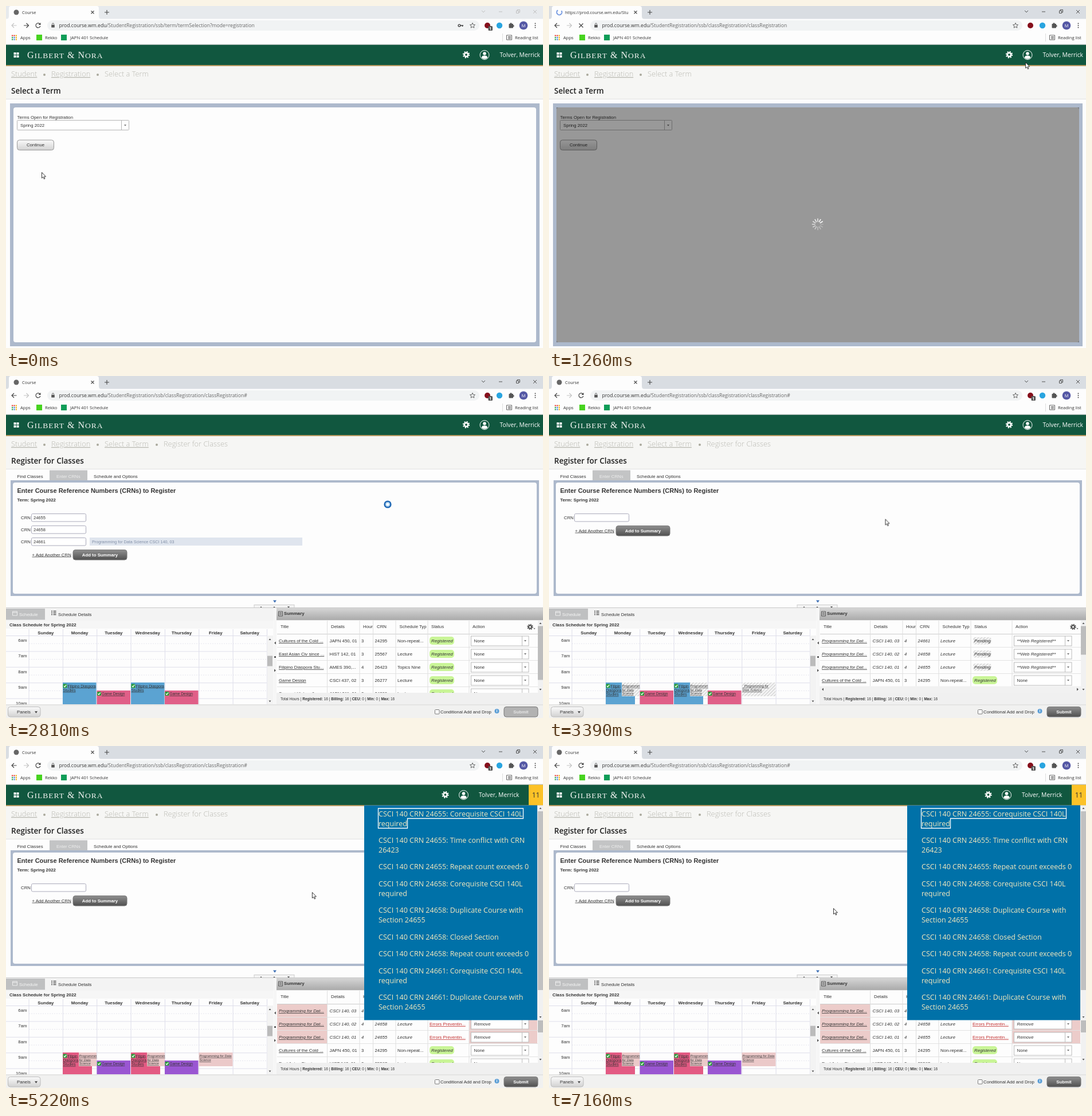
Recreate the animation shown at these times as an HTML page. Size 937 by 597 pixels, loop 7260 ms.

```html
<!DOCTYPE html>
<html lang="en">
<head>
<meta charset="utf-8">
<title>Register for Classes</title>
<style>
  html, body { margin: 0; width: 100%; height: 100%; overflow: hidden; background: #fdfdfd; }
  svg { display: block; font: 7.8px "Liberation Sans", Arial, sans-serif; fill: #333; }
  text { white-space: pre; }
  .ui { font-family: "Open Sans", "Noto Sans", sans-serif; }
  .serif { font-family: "Liberation Serif", serif; }
  .b { font-weight: 700; }
  .i { font-style: italic; }
  .u { text-decoration: underline; }
  .mid { text-anchor: middle; }
  .end { text-anchor: end; }
  .phase { animation: 7260ms step-end infinite; }
  .pointer { animation: pointer 7260ms linear infinite; }
  .spokes { animation: turn 1s steps(12) infinite; }
  .arc { animation: turn .9s linear infinite; }
  @keyframes turn { to { transform: rotate(360deg); } }
</style>
</head>
<body>
<svg id="stage" width="937" height="597" viewBox="0 0 937 597"></svg>
<script>
const LOOP = 7260;
// Moments at which the page changes, in ms
const FOCUS = 500, WAIT = 630, NAV = 1000, BLANK = 1840, OPEN = 2420, READY = 2520,
      FILLED = 2620, ADDED = 3290, SAVING = 3500, FAILED = 4740;

const rules = new Map();
const pct = ms => (ms / LOOP * 100).toFixed(3) + '%';

function on(from, to, body) {
  const name = `on${from}-${to}`;
  const steps = (from ? `0%{opacity:0}` : '') + `${pct(from)}{opacity:1}` +
    (to < LOOP ? `${pct(to)}{opacity:0}` : '');
  rules.set(name, `@keyframes ${name}{${steps}}`);
  return `<g class="phase" style="animation-name:${name}">${body}</g>`;
}
const R = (x, y, w, h, fill, more = '') =>
  `<rect x="${x}" y="${y}" width="${w}" height="${h}" fill="${fill}" ${more}/>`;
const T = (x, y, s, cls = '', more = '') => `<text x="${x}" y="${y}" class="${cls}" ${more}>${s}</text>`;
const P = (d, stroke, w = 1, more = '') =>
  `<path d="${d}" fill="none" stroke="${stroke}" stroke-width="${w}" ${more}/>`;
const C = (x, y, r, fill, more = '') => `<circle cx="${x}" cy="${y}" r="${r}" fill="${fill}" ${more}/>`;
const at = (x, y, body) => `<g transform="translate(${x} ${y})">${body}</g>`;
const size = n => `font-size="${n}"`;
const down = (x, y, fill = '#777', s = 2) => `<path d="M${x - s} ${y - s / 2}h${2 * s}l${-s} ${s * 1.4}z" fill="${fill}"/>`;
const up = (x, y, fill = '#777', s = 2) => `<path d="M${x - s} ${y + s / 2}h${2 * s}l${-s} ${-s * 1.4}z" fill="${fill}"/>`;
const side = (x, y, dir) => `<path d="M${x} ${y - 2.5}v5l${dir * 3} -2.5z" fill="#555"/>`;
const each = (list, fn) => list.map(fn).join('');

const gear = (x, y, fill, s = 1) => `<g transform="translate(${x} ${y}) scale(${s})">` +
  C(0, 0, 3.2, 'none', `stroke="${fill}" stroke-width="2.6"`) +
  C(0, 0, 5.2, 'none', `stroke="${fill}" stroke-width="2" stroke-dasharray="2.04"`) + '</g>';

const spinner = (x, y) => at(x, y, '<g class="spokes">' + each([...Array(12).keys()], k =>
  `<path d="M0 -5V-9.5" stroke="#fff" stroke-width="1.7" stroke-linecap="round" opacity="${(.2 + k * .07).toFixed(2)}" transform="rotate(${k * 30})"/>`) + '</g>');

const darkButton = (x, y, w, label, fill = 'url(#dark)', ink = '#fff') =>
  R(x, y, w, 17.5, fill, 'rx="4" stroke="#777"') + T(x + w / 2, y + 11.3, label, 'b mid', `style="fill:${ink}"`);

/* ---- browser frame ---- */
function titleBar(bar, ink) {
  return R(0, 0, 937, 23, bar) +
    P('M830 8l3 3 3-3M860 10h6M890.500 8.500h4v4h-4zM892 8v-1.500h4.500v4.500h-1.500M920 7l6 6M926 7l-6 6', ink, .9);
}
function navArrows(back, next) {
  return P('M18.500 34h-8M14 30l-4 4 4 4', back, 1.2) + P('M31 34h8M35.500 30l4 4-4 4', next, 1.2);
}
const badge = R(841.5, 35, 7.5, 8, '#555', 'rx="1.5"') + T(845.2, 41.5, '1', 'ui mid b', size(6.5) + ' style="fill:#fff"');
const reload = P('M59.300 31.500a4 4 0 1 0 .6 3.500', '#444', 1.2) + '<path d="M60.500 29v4h-4z" fill="#444"/>';
const favicon = C(18, 11, 4.5, '#666');
const address = path => T(92.5, 37.3, `prod.course.wm.edu<tspan fill="#666">/StudentRegistration/ssb/${path}</tspan>`, 'ui', size(8.6));
const appColors = ['#e4443a', '#e4443a', '#f2b51d', '#35a853', '#4285f4', '#f2b51d', '#35a853', '#4285f4', '#f2b51d'];

function browser() {
  return on(0, FOCUS, titleBar('#e7eaed', '#bbb')) + on(FOCUS, LOOP, titleBar('#d9dde2', '#444')) +
    '<path d="M0 23q5 0 5-5V4q0-4 4-4h149q4 0 4 4v14q0 5 5 5z" fill="#fdfdfd"/>' +
    P('M148.500 8.500l5 5M153.500 8.500l-5 5M172 11h8M176 7v8', '#444', 1.1) +
    on(0, NAV, favicon) + on(READY, LOOP, favicon) +
    on(NAV, READY, at(18, 11, '<g class="arc">' + P('M-4.500 0a4.500 4.500 0 1 1 4.500 4.500', '#4275d8', 1.5) + '</g>')) +
    on(NAV, BLANK, T(28, 14, 'https://prod.course.wm.edu/Stu', 'ui', size(7.4) + ' clip-path="url(#tab)"')) +
    each([[0, NAV], [BLANK, LOOP]], ([a, b]) => on(a, b, T(28, 14, 'Course', 'ui', size(7.4)))) +
    R(0, 22.5, 937, 44.5, '#fdfdfd') + R(72, 25, 754, 18, '#f1f3f4', 'rx="9"') +
    on(0, NAV, navArrows('#c4c4c4', '#444')) + on(NAV, LOOP, navArrows('#444', '#c4c4c4')) +
    on(0, NAV, reload) + on(READY, LOOP, reload) +
    on(NAV, READY, P('M52.500 30.500l7 7M59.500 30.500l-7 7', '#444', 1.2)) +
    R(79.2, 33, 5.6, 4.5, '#555', 'rx=".6"') + P('M80.500 33v-1.500a1.500 1.500 0 0 1 3 0v1.500', '#555', .9) +
    on(0, NAV, address('term/termSelection?mode=registration')) +
    on(NAV, READY, address('classRegistration/classRegistration')) +
    on(READY, LOOP, address('classRegistration/classRegistration#')) +
    on(0, NAV, C(791, 34, 1.9, 'none', 'stroke="#444" stroke-width="1.4"') + P('M793 34h5M796.500 34v2', '#444', 1.4)) +
    P('M814 29.500l1.300 3 3.200.3-2.400 2.100.7 3.200-2.800-1.700-2.800 1.700.7-3.200-2.400-2.100 3.200-.3z', '#555', .9) +
    C(840, 34, 5, '#850f1b') + on(0, NAV, badge) + on(READY, LOOP, badge) + C(861, 34, 5.2, '#2aa5e0') +
    R(877.5, 31, 7.5, 7.5, '#555', 'rx="1"') + C(881, 30.8, 1.5, '#555') + C(885.2, 34.7, 1.5, '#555') +
    C(903, 34, 7.3, '#5558a5') + T(903, 36.8, 'M', 'ui mid', size(7.4) + ' style="fill:#fff"') +
    each([30.5, 34, 37.5], y => C(923.5, y, .95, '#444')) +
    each(appColors, (c, k) => R(10 + k % 3 * 3.4, 50.6 + Math.floor(k / 3) * 3.4, 2.2, 2.2, c)) +
    R(53, 50, 10, 10, '#47d31f') + R(96, 50, 10, 10, '#0f9d58') +
    each([[25, 'Apps'], [68, 'Rekko'], [112, 'JAPN 401 Schedule'], [888, 'Reading list']],
      ([x, s]) => T(x, 57.5, s, 'ui', size(7.6))) +
    P('M866.500 48v14', '#ddd') + P('M873.500 51h9v8h-9zM876 53.500h5M876 55.200h5M876 57h5', '#555', .9) +
    P('M0 67h937', '#ccc');
}

/* ---- site header ---- */
const user = dx => at(dx, 0, gear(803, 85, '#fff') +
  C(835, 85.500, 8, 'none', 'stroke="#fff" stroke-width="1"') + C(835, 83, 2.8, '#fff') +
  '<path d="M829.800 90.500q0-4 5.200-4t5.200 4q-5.200 4-10.400 0z" fill="#fff"/>' +
  T(932, 89, 'Tolver, Merrick', 'ui end', size(10.3) + ' style="fill:#fff"'));

function header() {
  const low = s => `<tspan font-size="13.5">${s}</tspan>`;
  return R(0, 67.5, 937, 36, '#11573f') + R(0, 103, 937, 2, '#b99a62') + R(0, 105, 937, 57, '#f6f6f4') +
    P('M0 162.500h937', '#e2e2e2') +
    each([0, 1, 2, 3], k => R(13.500 + k % 2 * 5, 81 + (k >> 1) * 5, 4, 4, '#fff')) +
    T(37, 91, `G${low('ILBERT')} &amp; N${low('ORA')}`, 'serif', size(16) + ' letter-spacing="1" style="fill:#f2f5f2"') +
    on(0, FAILED, user(0)) + on(FAILED, LOOP, user(-36.5) + R(912, 67.5, 25, 36, '#fcc228') +
      T(924.5, 89.5, '11', 'ui mid', size(12)));
}
const crumb = (x, s, cls = 'u') => T(x, 123, s, 'ui ' + cls, size(12.8) + ' font-weight="300" style="fill:#b9b9b2"');
const dot = x => C(x, 120, 2, '#aaa99c');
const heading = s => T(9, 153, s, 'ui', size(13.5) + ' font-weight="600" style="fill:#222"');
const panel = (x, y, w, h, bx, by) => R(x, y, w, h, '#adb9cc') +
  R(x + bx, y + by, w - 2 * bx, h - 2 * by, '#fdfdfd', 'rx="4"');

/* ---- term page ---- */
function termPage() {
  return header() + crumb(9, 'Student') + dot(67) + crumb(79, 'Registration') + dot(160) +
    crumb(172, 'Select a Term', '') + heading('Select a Term') + panel(7, 170, 924, 424, 6, 7) +
    T(19.5, 197, 'Terms Open for Registration') +
    R(19.5, 199.500, 195, 17, '#fff', 'stroke="#b5b5b5" rx="1"') + P('M201.500 200v16', '#b5b5b5') +
    T(25, 211, 'Spring 2022') + down(208, 208) +
    R(19.5, 234, 64, 17.500, 'url(#light)', 'rx="4" stroke="#999"') + T(51.5, 245, 'Continue', 'mid') +
    on(WAIT, LOOP, R(13, 177, 912, 410, '#000', 'opacity=".4"') + spinner(469, 381));
}

/* ---- registration form ---- */
const crnRow = (y, value) => T(26, y + 3, 'CRN') +
  R(44.500, y - 6.500, 95, 13.500, '#fff', 'rx="2" stroke="#aab"') + T(48, y + 3, value, '', size(7.5));
const formEnd = y => T(45.5, y + 2.5, '+ Add Another CRN', 'u') + darkButton(117, y - 8.5, 94, 'Add to Summary');

function form() {
  const single = crnRow(247, '') + formEnd(270);
  return crumb(9, 'Student') + dot(67) + crumb(79, 'Registration') + dot(160) + crumb(172, 'Select a Term') +
    dot(263) + crumb(275, 'Register for Classes', '') + heading('Register for Classes') +
    R(76, 164.5, 66, 18, '#c3c4c5') + T(19.5, 178, 'Find Classes') +
    T(88, 178, 'Enter CRNs', '', 'style="fill:#eee"') + T(153, 178, 'Schedule and Options') +
    panel(8, 182, 922, 202, 4, 4) +
    T(19.5, 203.500, 'Enter Course Reference Numbers (CRNs) to Register', 'b', size(11)) +
    T(19.5, 219, 'Term: Spring 2022', 'b') +
    on(OPEN, FILLED, single) + on(ADDED, LOOP, single) +
    on(FILLED, ADDED, crnRow(247, '24655') + crnRow(268, '24658') + crnRow(289, '24661') +
      R(146, 282, 371, 14, '#dfe5ee') +
      T(150, 292, 'Programming for Data Science CSCI 140, 03', '', size(7.2) + ' style="fill:#7f8da5"') + formEnd(312));
}

/* ---- schedule ---- */
const check = (x, y) => R(x - 3.5, y - 3.5, 7, 7, '#2a9d3a', 'rx="1.5"') + P(`M${x - 2} ${y}l1.500 1.700 2.700-3.500`, '#fff', 1.2);
const lines = (x, y, list, cls, px, step) =>
  each(list, (s, k) => T(x + (k || cls.includes('i') ? 0 : 8), y + k * step, s, cls, size(px)));

function lecture(x, color, narrow) {
  return R(x, 535, narrow ? 51 : 58.5, 38, color) + check(x + 4, 541) +
    lines(x + .5, 543.500, narrow ? ['Filipin', 'Diaspora', 'Studies'] : ['Filipino Diaspora', 'Studies'], 'u', 6.6, 7.2);
}
const lab = (x, color) => R(x, 549, 58.5, 24, color) + check(x + 4, 554.5) + T(x + 8.5, 557, 'Game Design', 'u', size(6.6));
const added = (x, fill, list) => R(x, 535, 31, 24, fill) + lines(x + .5, 543, list, 'u i', 5.7, 6.7);

function events(main, second, fill) {
  const names = ['Programmin', 'for Data', 'Science'];
  return lecture(99, main, !!fill) + lab(158.5, second) + lecture(218, main, !!fill) + lab(277, second) +
    (fill ? added(127, fill, names) + added(246, fill, names) + R(336.5, 535, 59, 24, fill) +
      lines(337.5, 543, fill[0] === 'u' ? ['  Programming for', 'Data Science'] : ['Programming for Data', 'Science'], 'u i', 5.7, 7) : '');
}

function schedule() {
  const days = ['Sunday', 'Monday', 'Tuesday', 'Wednesday', 'Thursday', 'Friday', 'Saturday'];
  const hours = ['6am', '7am', '8am', '9am', '10am'];
  return R(0, 405, 470, 22, '#f3f3f3') + P('M0 404.500h937', '#c9c9c9') +
    R(0, 406, 68, 19.5, '#bfc0c1') + P('M11.500 411h8v7h-8zM11.500 413h8', '#eee') + T(23, 419, 'Schedule', '', 'style="fill:#f7f7f7"') +
    P('M79 410.500h2M79 413.500h2M79 416.500h2M82.500 410.500h5M82.500 413.500h5M82.500 416.500h5', '#555', 1.6) + T(91, 419, 'Schedule Details') +
    R(0, 427, 466, 14, '#f6f6f6') + T(6, 437, 'Class Schedule for Spring 2022', 'b') +
    each(days, (d, k) => T(69.3 + k * 59.3, 451, d, 'mid b')) +
    each(hours, (h, k) => T(36.5, 464 + k * 27.4, h, 'end') + P(`M0 ${453.5 + k * 27.4}H455`, '#dedeea') +
      P(`M40 ${467.2 + k * 27.4}H455`, '#e6e6ee', 1, 'stroke-dasharray="2"')) +
    each([...Array(8).keys()], k => P(`M${40 + k * 59.35} 442V573`, '#dedeea')) +
    on(OPEN, ADDED, events('#5ba3d2', '#e05f88')) +
    on(ADDED, FAILED, events('#5ba3d2', '#e05f88', 'url(#hatch)')) +
    on(FAILED, LOOP, events('#e35a83', '#9a56d2', '#ebc9c9')) +
    R(455.500, 453, 10.500, 120, '#f3f3f3') + up(460.500, 460, '#555') + R(456, 488.500, 9, 18, '#bbb') + down(460.500, 567.500, '#555') +
    R(466.500, 405, 5.500, 168, '#f6f6f6') + side(471, 466, -1) + C(469.500, 490.500, 1.500, '#333') + side(468, 514, 1);
}

/* ---- summary ---- */
const select = (y, label, cls = '') => R(811.500, y - 8, 100.500, 17, '#fff', 'stroke="#bbb"') +
  P(`M900.500 ${y - 8}v17`, '#bbb') + T(816.5, y + 3, label, cls) + down(906, y, '#777');

function row(k, [title, details, hours, crn, type, status]) {
  const y = 462 + k * 23, cls = status ? 'i' : '', bad = status === 'bad';
  const pill = bad ? T(739, y + 3, 'Errors Preventin...', 'u', 'style="fill:#c22f2f"')
    : status ? R(740, y - 6, 32, 12.500, 'url(#hatch)', 'rx="4"') + T(742, y + 3, 'Pending', 'i')
    : R(739, y - 7, 43, 14, '#c9f597', 'rx="5"') + T(742, y + 3, 'Registered', 'i');
  return (bad ? R(473, y - 11, 87, 22.500, '#ecccca') + R(808, y - 11, 119, 22.500, '#ecccca') : '') +
    T(476, y + 3, title, 'u ' + cls) +
    each([[564.500, details], [620, hours], [643.500, crn], [683, type]], ([x, s]) => T(x, y + 3, s, cls)) + pill +
    select(y, bad ? 'Remove' : status ? '**Web Registered**' : 'None', cls) + P(`M473 ${y + 11.500}H928`, '#e3e3e3');
}
const kept = [
  ['Cultures of the Cold ...', 'JAPN 450, 01', 3, 24295, 'Non-repeat...'],
  ['East Asian Civ since ...', 'HIST 142, 01', 3, 25567, 'Lecture'],
  ['Filipino Diaspora Stu...', 'AMES 390,...', 4, 26423, 'Topics Nine'],
  ['Game Design', 'CSCI 437, 02', 3, 26277, 'Lecture'],
  ['Samurai History &amp; ...', 'JAPN 311, 01', 3, 24300, 'Lecture']];
const fresh = status => [['03', 24661], ['02', 24658], ['01', 24655]]
  .map(([s, crn]) => ['Programming for Dat...', 'CSCI 140, ' + s, 4, crn, 'Lecture', status]);
const rows = list => `<g clip-path="url(#rows)">${each(list.slice(0, 5), (r, k) => row(k, r))}</g>`;

function summary() {
  const heads = [[479, 'Title'], [567, 'Details'], [623, 'Hour'], [647, 'CRN'], [686.500, 'Schedule Typ'], [742, 'Status'], [814, 'Action']];
  const nums = each([['Registered', 16], ['Billing', 16], ['CEU', 0], ['Min', 0], ['Max', 16]],
    ([n, v]) => ` | <tspan class="b">${n}:</tspan> ${v}`);
  const thumb = h => R(928, 436.500, 9, h, '#bdbdbd');
  return R(472, 405, 465, 21.500, 'url(#bar)') + P('M475.500 411h7v8h-7zM477 413.500h4M477 416h4', '#555') + T(485, 417, 'Summary', 'b') +
    R(472, 426.500, 465, 127, '#fdfdfd') + each(heads, ([x, s]) => T(x, 440, s)) + gear(914.500, 438, '#555', .85) + down(922, 441, '#555', 1.5) +
    P('M473 450.500H928', '#ccc') + on(OPEN, ADDED, rows(kept)) +
    on(ADDED, FAILED, rows([...fresh('wait'), ...kept])) + on(FAILED, LOOP, rows([...fresh('bad'), ...kept])) +
    each([560.500, 617, 640.500, 680, 736, 808], x => P(`M${x} 427V553`, '#dedede')) +
    on(SAVING, FAILED, R(472, 426.500, 456, 114.500, '#000', 'opacity=".42"') + `<g clip-path="url(#wait)">${spinner(706, 533)}</g>`) +
    on(ADDED, FAILED, R(472, 541.5, 456, 11.500, '#f1f1f1') + side(479, 547, -1) + side(921, 547, 1)) +
    R(928, 427, 9, 126, '#f1f1f1') + up(932.500, 432, '#555') + down(932.500, 547, '#555') +
    on(OPEN, ADDED, thumb(94)) + on(ADDED, FAILED, thumb(50)) + on(FAILED, LOOP, R(928, 479, 9, 21, '#bdbdbd')) +
    R(472, 553, 465, 20.500, '#f0f0f0') + T(479, 565.500, 'Total Hours' + nums, '', size(6.5));
}

function footer() {
  const submit = (fill, ink) => darkButton(869, 577.500, 59, 'Submit', fill, ink);
  const idle = submit('#b2b2b2', '#e6e6e6'), live = submit('url(#dark)', '#fff');
  return R(0, 573.5, 937, 24, '#f1f1f0') + P('M0 574h937', '#d5d5d5') +
    R(3.500, 577.500, 56.500, 17.500, 'url(#light)', 'rx="4" stroke="#bbb"') + T(19, 589, 'Panels') + down(52.500, 586.500, '#444', 2.5) +
    R(748.500, 582.500, 7.500, 7.500, '#fff', 'rx="1" stroke="#777"') + T(758, 589, 'Conditional Add and Drop') +
    C(856.500, 585, 4, '#5d9fd6') + T(856.500, 587.300, 'i', 'b mid', size(6.5) + ' style="fill:#fff"') +
    on(OPEN, ADDED, idle) + on(ADDED, SAVING, live) + on(SAVING, FAILED, idle) + on(FAILED, LOOP, live);
}

/* ---- error list ---- */
function errors() {
  const items = [
    [122.500, '24655: Corequisite CSCI 140L', 'required'], [168.500, '24655: Time conflict with CRN', '26423'],
    [215, '24655: Repeat count exceeds 0'], [244.500, '24658: Corequisite CSCI 140L', 'required'],
    [291, '24658: Duplicate Course with', 'Section 24655'], [337.500, '24658: Closed Section'],
    [367, '24658: Repeat count exceeds 0'], [396.500, '24661: Corequisite CSCI 140L', 'required'],
    [442.500, '24661: Duplicate Course with', 'Section 24655']];
  const line = (y, s) => T(650, y, s, 'ui', size(12.5) + ' style="fill:#f4e8bd"');
  return R(625, 103.500, 302, 375, '#0071a8') + R(927, 103.500, 10, 375, '#f1f1f1') + up(932.500, 109, '#555') +
    R(928, 114, 9, 312, '#c1c1c1') + down(932.500, 473, '#555') +
    each(items, ([y, a, b]) => line(y, 'CSCI 140 CRN ' + a) + (b ? line(y + 17, b) : '')) +
    P('M649.500 109h253v17.500h-202v17h-51z', '#fff', 1.3);
}

function registerPage() {
  return header() + form() + down(469, 393, '#3d6fb5', 3) + R(433, 399.500, 70, 6, '#f4f4f4', 'stroke="#ccc"') +
    up(445, 404, '#333') + C(468, 404, 1.3, '#333') + down(493, 403.500, '#333') +
    schedule() + summary() + footer() + on(FAILED, LOOP, errors());
}

/* ---- pointer ---- */
const path = [[0, 62, 290], [400, 52, 243], [680, 52, 243], [1260, 831, 98], [1900, 838, 58], [2320, 839, 37],
  [2450, 837, 42], [2810, 666, 224], [3000, 664, 226], [3600, 545, 262], [4060, 537, 260], [5900, 532, 252],
  [7160, 496, 283], [LOOP, 496, 283]];
rules.set('pointer', `@keyframes pointer{${each(path, ([t, x, y]) => `${pct(t)}{transform:translate(${x}px,${y}px)}`)}}`);
const arrow = '<path d="M.5 .5v10l2.300-2 1.600 3.600 1.500-.7-1.500-3.500h3.100z" fill="#fff" stroke="#222" stroke-width=".9"/>';
const ring = C(0, 0, 5.3, '#fff', 'stroke="#1c66b4" stroke-width="2.6"') + C(0, 0, 3.2, 'none', 'stroke="#7db9e8" stroke-width="1"');

const grad = (id, a, b) => `<linearGradient id="${id}" x2="0" y2="1"><stop stop-color="${a}"/><stop offset="1" stop-color="${b}"/></linearGradient>`;
const clip = (id, ...box) => `<clipPath id="${id}">${R(...box, '#000')}</clipPath>`;
const defs = '<defs>' + grad('light', '#fafafa', '#d2d2d2') + grad('dark', '#909090', '#505050') + grad('bar', '#d6d6d6', '#a9a9a9') +
  clip('tab', 28, 0, 113, 22) + clip('rows', 472, 451, 456, 102) + clip('wait', 472, 427, 456, 114) +
  '<pattern id="hatch" width="4" height="4" patternUnits="userSpaceOnUse" patternTransform="rotate(45)">' +
  R(0, 0, 4, 4, '#f6f6f6') + R(0, 0, 1.3, 4, '#d0d0d0') + '</pattern></defs>';

const scene = defs + R(0, 0, 937, 597, '#fdfdfd') + on(0, BLANK, termPage()) + on(OPEN, LOOP, registerPage()) + browser() +
  '<g class="pointer">' + on(0, READY, arrow) + on(READY, 3100, ring) + on(3100, LOOP, arrow) + '</g>';

const sheet = document.createElement('style');
sheet.textContent = [...rules.values()].join('\n');
document.head.append(sheet);
document.getElementById('stage').innerHTML = scene;
</script>
</body>
</html>
```
